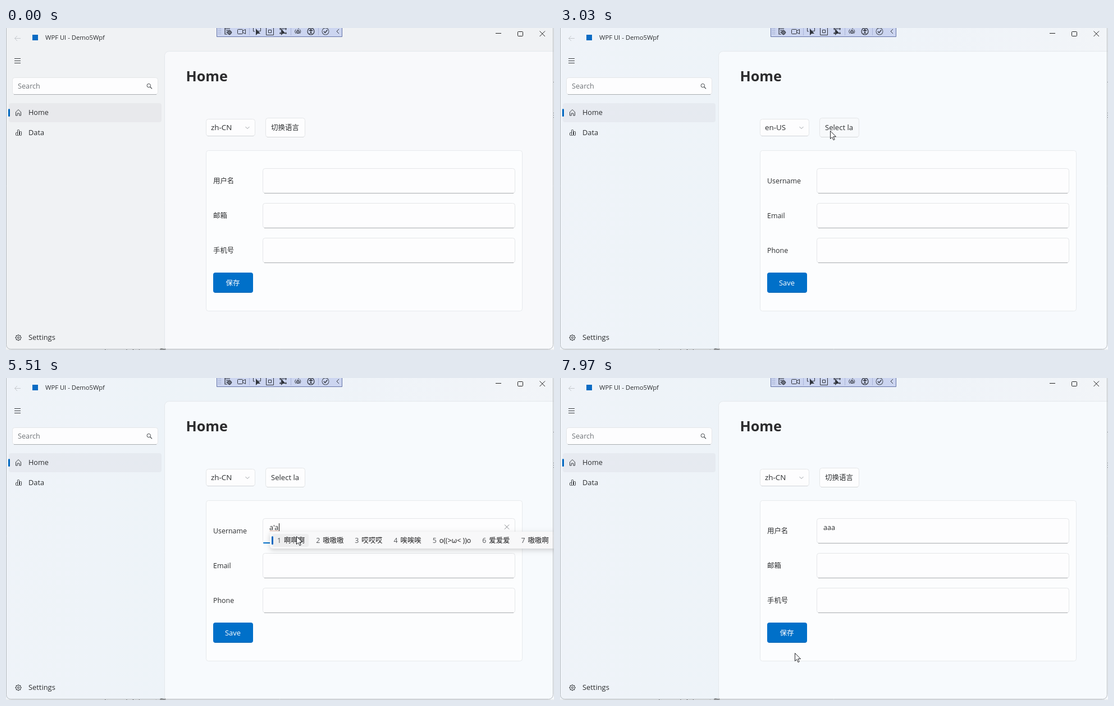
Animation of 976x574 px, one loop 8 s. Source, as an HTML page with a canvas:

```html
<!DOCTYPE html>
<html lang="zh-CN">
<head>
<meta charset="utf-8">
<title>WPF UI - Demo5Wpf</title>
<style>
html, body { margin: 0; width: 100%; height: 100%; overflow: hidden; background: #f1f3f5; }
canvas { display: block; width: 976px; height: 574px; }
</style>
</head>
<body>
<canvas id="stage" width="976" height="574"></canvas>
<script>
const ctx = document.getElementById('stage').getContext('2d');
const LOOP = 8000;
const FONT = '"Open Sans", "Noto Sans CJK SC", "Noto Sans CJK", "Noto Sans", sans-serif';
const INK = '#2b2d2f', BLUE = '#0070c9';

// pointer path: time, x, y
const PATH = [
  [70, 948, 502], [250, 800, 400], [480, 590, 262], [790, 433, 175], [889, 433, 175], [890, 428, 181],
  [1240, 428, 181], [1440, 412, 210], [1660, 412, 210], [1780, 388, 242], [2080, 388, 242],
  [2290, 475, 187], [2600, 475, 187], [2690, 481, 183], [3030, 481, 183], [3210, 517, 230],
  [3370, 517, 230], [3550, 423, 186], [3960, 423, 186], [4100, 398, 214], [4260, 398, 214],
  [4540, 477, 250], [4600, 475, 240], [4700, 475, 240], [4820, 517, 282], [6060, 517, 282],
  [6320, 481, 179], [7120, 481, 179], [7320, 492, 250], [7540, 447, 399], [7720, 466, 330],
  [7909, 477, 264], [7970, 418, 490]
];
const CLICKS = [[1140, 1290], [2000, 2110], [2390, 2540], [3740, 3890], [4150, 4270], [4830, 4950], [6510, 6650]];
const OPENINGS = [[1180, 2060], [3790, 4210]];
const TYPED = [[0, ''], [5080, 'a'], [5390, "a'a"], [5580, "a'a'a"], [6010, 'aaa']];
const CANDIDATES = [
  [5080, ['啊', '阿', '吖', '嗄', '呵', '锕', '腌']],
  [5390, ['啊啊', '嗷嗷', '哎哎', '唉唉', '爱爱', '嗷啊', '啊']],
  [5450, ['啊啊啊', '嗷嗷嗷', '哎哎哎', '唉唉唉', 'o((>ω< ))o', '爱爱爱', '嗷嗷啊']]
];
const WORDS = {
  zh: { change: '切换语言', fields: ['用户名', '邮箱', '手机号'], save: '保存' },
  en: { change: 'Select la', fields: ['Username', 'Email', 'Phone'], save: 'Save' }
};

const clamp = v => Math.max(0, Math.min(1, v));
const during = (t, [a, b]) => t >= a && t < b;
const latest = (list, t) => list.filter(e => t >= e[0]).pop()[1];
const mix = (a, b, k) => `rgb(${a.map((v, i) => Math.round(v + (b[i] - v) * k))})`;

function text(s, x, y, size, color = INK, weight = 400, align = 'left') {
  ctx.font = `${weight} ${size}px ${FONT}`;
  ctx.fillStyle = color;
  ctx.textAlign = align;
  ctx.fillText(s, x, y);
}
function box(x, y, w, h, r, fill, stroke) {
  ctx.beginPath();
  ctx.roundRect(x, y, w, h, r);
  if (fill) { ctx.fillStyle = fill; ctx.fill(); }
  if (stroke) { ctx.strokeStyle = stroke; ctx.lineWidth = 1; ctx.stroke(); }
}
function line(d, color = INK, width = 1) {
  ctx.strokeStyle = color;
  ctx.lineWidth = width;
  ctx.stroke(new Path2D(d));
}
function ring(x, y, r, color = INK, width = 1) {
  ctx.beginPath();
  ctx.arc(x, y, r, 0, 7);
  ctx.strokeStyle = color;
  ctx.lineWidth = width;
  ctx.stroke();
}
function shadowed(blur, draw) {
  ctx.save();
  ctx.shadowColor = 'rgba(0,0,0,.18)';
  ctx.shadowBlur = blur;
  ctx.shadowOffsetY = blur / 3;
  draw();
  ctx.restore();
}
// control with a slightly stronger lower edge
function control(x, y, w, h, fill, edge) {
  box(x + .5, y + .5, w - 1, h - 1, 4, fill, '#e4e6e8');
  line(`M${x + 3} ${y + h - .5}H${x + w - 3}`, edge);
}

function pointer(t) {
  if (t < PATH[0][0]) return null;
  let i = PATH.length - 1;
  while (PATH[i][0] > t) i--;
  const a = PATH[i], b = PATH[i + 1] || a;
  const k = b === a ? 0 : (t - a[0]) / (b[0] - a[0]);
  return { x: a[1] + (b[1] - a[1]) * k, y: a[2] + (b[2] - a[2]) * k };
}
function drawPointer({ x, y }, pressed) {
  if (pressed) {
    ctx.beginPath();
    ctx.arc(x, y - .5, 10.3, 0, 7);
    ctx.fillStyle = 'rgba(255,250,20,.65)';
    ctx.fill();
  }
  ctx.save();
  ctx.translate(Math.round(x) + .5, Math.round(y) + .5);
  const arrow = new Path2D('M0 0V14L3.2 11L5.5 16.2L7.7 15.2L5.4 10.2H10Z');
  ctx.fillStyle = '#fff';
  ctx.fill(arrow);
  ctx.strokeStyle = '#26282c';
  ctx.lineWidth = 1;
  ctx.stroke(arrow);
  ctx.restore();
}

function debugBar() {
  const c = '#30343c';
  box(375.5, -4, 223, 19.5, 0, '#ccd5f0', '#6574a8');
  ctx.fillStyle = '#8190ba';
  for (let i = 0; i < 12; i++) ctx.fillRect(378 + i % 3 * 2, 1 + (i / 3 | 0) * 3, 1, 1);
  line('M390 0V11H394M390 1.5H399M392 4.5H396M392 7.5H394', c, 1.2);
  ring(398, 8, 3, c, 1.3);
  line('M398 3.5V12.5M393.5 8H402.5', c);
  box(412.5, 2.5, 9, 8, 1, null, c);
  line('M422 5L426.5 2.5V10.5L422 8', c);
  line('M433.5 0V13M507.5 0V13M556.5 0V13', '#aab5d8');
  line('M440.5 0V6H443M449 5.5H453.5V0', c);
  box(463.5, -.5, 13, 13, 0, null, c);
  box(467.5, 3.5, 5, 5, 0, null, c);
  line('M487 1.5H500M488.5 0V4M498.5 0V4M487 9.5H490M497 9.5H500M488.5 7V11M498.5 7V11', c);
  ctx.fillStyle = c;
  for (const x of [445, 490]) ctx.fill(new Path2D(`M${x} 1V13L${x + 3} 10H${x + 8}Z`));
  line('M516.5 2.5Q513 6 516.5 10M523 2.5Q526.5 6 523 10', c);
  ring(520, 7, 2.2, c, 1.4);
  line('M519 3L522 1', c);
  ring(543, 6, 6, c, 1.2);
  line('M539.5 4.5H546.5M543 4.5V7.5L541 10.5M543 7.5L545 10.5', c, 1.3);
  ring(543, 2.7, .8, c, 1.2);
  ring(569, 6, 6, '#555b66', 1.1);
  line('M566 6L568.3 8.5L572.3 3.5', c, 1.4);
  line('M593 2L589 6L593 10', c);
}

function frameAndSidebar(k) {
  ctx.fillStyle = mix([240, 242, 244], [237, 243, 248], k);
  ctx.fillRect(0, 0, 976, 574);
  const tint = ctx.createLinearGradient(0, 0, 976, 0);
  tint.addColorStop(0, `rgba(242,243,249,${.35 * k})`);
  tint.addColorStop(.4, 'rgba(242,243,249,0)');
  tint.addColorStop(1, `rgba(243,245,248,${.8 * k})`);
  ctx.fillStyle = tint;
  ctx.fillRect(0, 0, 976, 574);
  box(282.5, 41.5, 700, 540, 8, mix([248, 249, 251], [247, 250, 253], k), '#e4e8ec');

  line('M26 18.5H15.5M20 14L15.5 18.5L20 23', '#c4c8cc');
  box(47, 12, 10, 10, 0, '#0b6cc4');
  text('WPF UI - Demo5Wpf', 70, 21, 11.25);
  line('M872 9.5H882M950.5 5.5L960 15M960 5.5L950.5 15', '#222');
  box(911.5, 6.5, 9, 8, 1, null, '#222');
  line('M15 54.5H26M15 58.5H26M15 62.5H26', '#3c3f42');

  control(11, 88, 260, 31, '#fdfdfe', '#a9adb1');
  text('Search', 21, 108, 12.7, '#707478');
  ring(254.3, 102.6, 3.2, '#44484c');
  line('M256.7 105L260 108.3', '#44484c', 1.2);

  box(5, 134, 272, 34, 4, 'rgba(20,20,30,.037)');
  box(4, 144, 3, 14, 1.5, '#0067c0');
  line('M17.5 150L22 145.5L26.5 150V156H23.8V152H20.2V156H17.5Z', '#3a3d40');
  text('Home', 40, 155, 12.7);
  for (const [x, y] of [[17.5, 186.5], [20.5, 181.5], [24.5, 184.5]])
    box(x, y, 3, 191.5 - y, 1, null, '#3a3d40');
  text('Data', 40, 191, 12.8);
  ring(22, 552, 4.3, '#3a3d40', 1.1);
  ring(22, 552, 1.6, '#3a3d40');
  for (let i = 0; i < 8; i++) {
    const a = i * Math.PI / 4, c = Math.cos(a), s = Math.sin(a);
    line(`M${22 + 4.2 * c} ${552 + 4.2 * s}L${22 + 5.6 * c} ${552 + 5.6 * s}`, '#3a3d40', 1.6);
  }
  text('Settings', 40, 556, 12.9);
  text('Home', 320.5, 95, 25.2, '#2c2c2e', 700);
}

function edges() {
  ctx.fillStyle = '#e6e8ea';
  ctx.fillRect(0, 573, 976, 1);
  ctx.save();
  ctx.beginPath();
  ctx.rect(100, 571, 196, 3);
  ctx.clip();
  text('▪  ScreenToGif.exe + 截', 158, 580, 11.5, '#555');
  ctx.restore();
  ctx.fillStyle = '#8c9197';
  for (const y of [96, 151, 155, 159]) ctx.fillRect(974, y, 2, 1);
  box(.5, -10, 974, 582.5, 8, null, '#b4b9be');
}

function form(t, words, hover) {
  const over = (x, y, w, h) => hover && hover.x >= x && hover.x < x + w && hover.y >= y && hover.y < y + h;
  const face = on => on ? '#f7f9fb' : '#fdfdfe';
  control(356, 162, 88, 31, face(over(356, 162, 88, 31)), '#d2d5d8');
  text(t >= 2060 && t < 4210 ? 'en-US' : 'zh-CN', 365, 182, 13.4);
  line('M426.5 176L430 179.5L433.5 176', '#9b9fa3');
  control(462, 160, 71, 35, face(over(462, 160, 71, 35)), '#d6d8da');
  text(words.change, 497, 182, words === WORDS.en ? 13.1 : 12.5, INK, 400, 'center');

  box(356.5, 218.5, 563, 286, 4, '#fcfdfe', '#e7eaed');
  words.fields.forEach((label, i) => {
    const y = 250 + i * 62;
    text(label, 369, y + 26.5, 12.4);
    control(457, y, 450, 45, '#fdfdfe', '#a8abae');
  });
  box(369, 436, 71, 36, 4, BLUE);
  line('M372 471.5H437', '#0060ad');
  text(words.save, 404, 459, words === WORDS.en ? 12.9 : 12.5, '#fff', 400, 'center');
}

function username(t) {
  const typed = latest(TYPED, t), focus = during(t, [4880, 6590]);
  text(typed, 469, 270.5, 12.6);
  if (!focus) return;
  const end = 469.5 + ctx.measureText(typed).width;
  box(458, 293, 448, 2, 1, BLUE);
  ctx.fillStyle = '#111';
  ctx.fillRect(Math.round(end), 259, 1, 14);
  if (typed) line('M888 261.5L896 269.5M896 261.5L888 269.5', '#84888c');
  if (!during(t, [5080, 6010])) return;
  ctx.setLineDash([1, 1]);
  line(`M470 272.5H${end}`, '#c0623a');
  ctx.setLineDash([]);
  candidates(latest(CANDIDATES, t));
}
function candidates(list) {
  shadowed(8, () => box(470, 274, 530, 30, 5, '#f8f8f9'));
  let x = 483;
  list.forEach((word, i) => {
    ctx.font = `500 12.4px ${FONT}`;
    const w = ctx.measureText(word).width;
    if (!i) {
      box(474, 278, w + 28, 23, 4, '#eeeeef');
      box(473, 282, 3, 15, 1.5, '#0067c0');
    }
    text(i + 1, x, 294, 12.4, '#55585c');
    text(word, x + 12, 294, 12.4, '#1c1c1e', 500);
    x += w + 32;
  });
}

function dropdown(t, hover) {
  const span = OPENINGS.find(s => during(t, s));
  if (!span) return;
  const k = 1 - (1 - clamp((t - span[0]) / 180)) ** 3;
  ctx.save();
  ctx.globalAlpha = clamp(k * 1.5);
  shadowed(6, () => box(357, 196, 86, 72 * k, 5, '#fcfcfd', '#e1e4e7'));
  ctx.beginPath();
  ctx.rect(357, 196, 86, 72 * k);
  ctx.clip();
  ['zh-CN', 'en-US'].forEach((name, i) => {
    const y = 199 + i * 34;
    const chosen = (i === 1) === (t > 2060);
    const on = hover && hover.y >= y && hover.y < y + 33;
    if (chosen || on) box(361, y, 78, 32, 4, '#f2f3f5');
    if (chosen) box(361, y + 8, 3, 16, 1.5, '#0067c0');
    text(name, 371, y + 20.5, 13.4);
  });
  ctx.restore();
}

function draw(t) {
  const p = pointer(t);
  const words = during(t, [2510, 6600]) ? WORDS.en : WORDS.zh;
  frameAndSidebar(clamp((t - 1140) / 300));
  form(t, words, p);
  username(t);
  dropdown(t, p);
  edges();
  debugBar();
  if (p) drawPointer(p, CLICKS.some(c => during(t, c)));
}

const start = performance.now();
function tick() {
  draw((performance.now() - start) % LOOP);
  requestAnimationFrame(tick);
}
tick();
</script>
</body>
</html>
```
